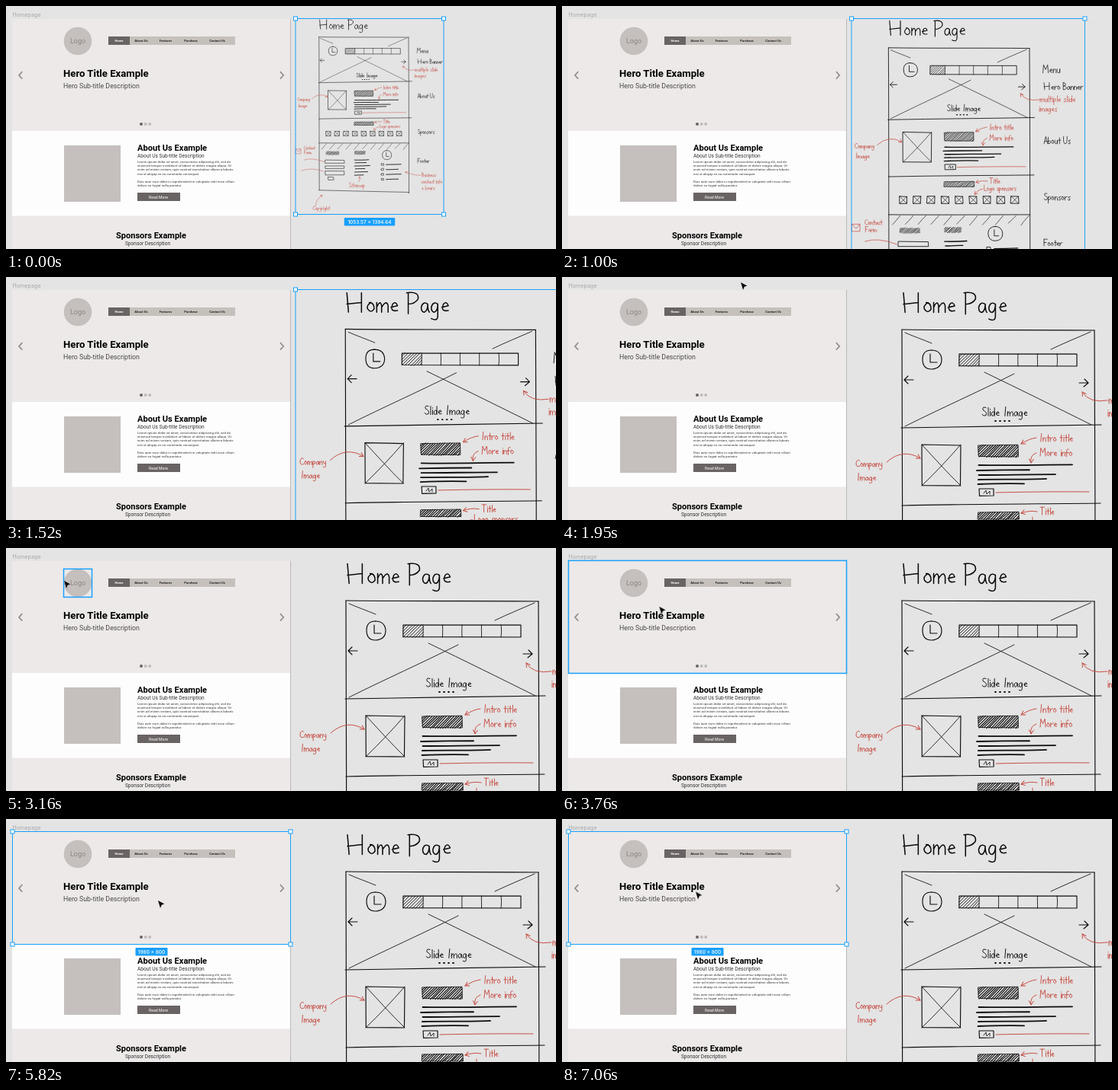
These frames come from a looping animation (720 px wide and 319 px high, 7330 ms). An HTML page:

```html
<!DOCTYPE html>
<html lang="en">
<head>
<meta charset="utf-8">
<title>Wireframe to mockup</title>
<style>
html, body { margin: 0; width: 100%; height: 100%; overflow: hidden; background: #e4e4e4; }
svg { display: block; width: 720px; height: 319px; }
text { font-family: Roboto, "Open Sans", sans-serif; fill: #111; }
.b { font-weight: 700; fill: #000; }
.mid { text-anchor: middle; }
.nav text { font-size: 4.2px; font-weight: 700; text-anchor: middle; fill: #222; }
.nav .on, .btn { fill: #fff; }
.body text { font-size: 4.4px; fill: #333; }
.ui, .tag text { font-family: Inter, Roboto, sans-serif; }
.chev { fill: none; stroke: #97918f; stroke-width: 1.8; }
.edge { fill: none; stroke: #18a0fb; }
.grip { fill: #fff; stroke: #18a0fb; }
.tag rect { fill: #18a0fb; }
.tag text { font-size: 6.5px; font-weight: 500; fill: #fff; text-anchor: middle; }
#sketch path { fill: none; stroke: #0c0c0c; stroke-linecap: round; stroke-linejoin: round; stroke-width: 1.15; }
#sketch .thin { stroke-width: .85; }
#sketch .bold { stroke-width: 1.8; }
#sketch .red { stroke: #c5483f; stroke-width: .95; }
.loop { animation: 7330ms infinite; }
#cursor { animation-name: roam; animation-timing-function: ease-in-out; }
#logoHover { animation-name: logoHover; animation-timing-function: step-end; }
#heroHover { animation-name: heroHover; animation-timing-function: step-end; }
#heroPick { animation-name: heroPick; animation-timing-function: step-end; }
@keyframes roam {
  0%, 24.96% { opacity: 0; transform: translate(239px, 9px); }
  24.97% { opacity: 1; transform: translate(239px, 9px); }
  26.55%, 37.24% { transform: translate(234px, 7px); }
  43.05%, 43.9% { transform: translate(76px, 43px); }
  46.66%, 47.34% { transform: translate(92px, 60px); }
  56.75%, 57.84% { transform: translate(188px, 106px); }
  64.2%, 64.7% { transform: translate(213px, 114px); }
  66.58%, 69.58% { transform: translate(214px, 115px); }
  71.9%, 75.03% { transform: translate(210px, 112px); }
  79.4%, 88.68% { transform: translate(199px, 107px); }
  89.9%, 92.5% { transform: translate(195px, 105px); }
  96.3%, 100% { opacity: 1; transform: translate(175px, 95.5px); }
}
@keyframes logoHover { 0% { opacity: 0; } 42.4% { opacity: 1; } 47.34% { opacity: 0; } }
@keyframes heroHover { 0% { opacity: 0; } 39.6% { opacity: 1; } 42.4% { opacity: 0; } 47.34% { opacity: 1; } 58.5% { opacity: 0; } }
@keyframes heroPick { 0% { opacity: 0; } 58.5%, 100% { opacity: 1; } }
</style>
</head>
<body>
<svg viewBox="0 0 720 319">
  <rect width="720" height="319" fill="#e4e4e4"/>
  <text class="ui" x="8.5" y="14.3" font-size="7" letter-spacing=".1" style="fill:#a6a6a6">Homepage</text>

  <rect x="8" y="17" width="364" height="302" fill="#ece9e8"/>
  <rect x="8" y="164" width="364" height="111.5" fill="#fefdfd"/>
  <path d="M372.5 17V319" stroke="#b9b9b9"/>

  <circle cx="94" cy="46" r="18.3" fill="#c5bfbd"/>
  <text class="mid" x="94" y="49" font-size="9" style="fill:#8c8582">Logo</text>
  <g class="nav">
    <rect x="134" y="40" width="166" height="11" fill="#c6c0bd"/>
    <rect x="134" y="40" width="28" height="11" fill="#6a6363"/>
    <text class="on" x="148" y="47">Home</text>
    <text x="177" y="47">About Us</text>
    <text x="209" y="47">Features</text>
    <text x="242" y="47">Purchase</text>
    <text x="276.5" y="47">Contact Us</text>
  </g>
  <path class="chev" d="M21.3 86.2L17 91L21.3 95.6M358.9 86.2L363.2 91L358.9 95.6"/>
  <text class="b" x="75" y="93.3" font-size="13.15">Hero Title Example</text>
  <text x="75" y="107.8" font-size="8.8" style="fill:#4c4a4a">Hero Sub-title Description</text>
  <circle cx="177" cy="155" r="2" fill="#6a6363"/>
  <circle cx="182.7" cy="155" r="2" fill="#c0bab8"/>
  <circle cx="188.2" cy="155" r="2" fill="#c0bab8"/>

  <rect x="76" y="183" width="74" height="74" fill="#c5bfbd"/>
  <text class="b" x="172" y="190.2" font-size="11.1">About Us Example</text>
  <text x="172" y="199.2" font-size="6.6" style="fill:#333">About Us Sub-title Description</text>
  <g class="body">
    <text x="172" y="206.2">Lorem ipsum dolor sit amet, consectetur adipiscing elit, sed do</text>
    <text x="172" y="211.3">eiusmod tempor incididunt ut labore et dolore magna aliqua. Ut</text>
    <text x="172" y="216.4">enim ad minim veniam, quis nostrud exercitation ullamco laboris</text>
    <text x="172" y="221.5">nisi ut aliquip ex ea commodo consequat.</text>
    <text x="172" y="231.7">Duis aute irure dolor in reprehenderit in voluptate velit esse cillum</text>
    <text x="172" y="236.8">dolore eu fugiat nulla pariatur.</text>
  </g>
  <rect x="172" y="245" width="56" height="11" fill="#6a6363"/>
  <text class="btn mid" x="199.5" y="252.6" font-size="5.2">Read More</text>

  <text class="b mid" x="190" y="304.8" font-size="11">Sponsors Example</text>
  <text class="mid" x="185.5" y="313.6" font-size="6.55" style="fill:#333">Sponsor Description</text>

  <g id="sketch"></g>
  <g id="sketchPick"></g>

  <rect id="heroHover" class="edge loop" x="8.5" y="16.5" width="364" height="148" stroke-width="1.5"/>
  <rect id="logoHover" class="edge loop" x="75.5" y="27.5" width="37" height="37" stroke-width="1.5"/>
  <g id="heroPick" class="loop"></g>
  <path id="cursor" class="loop" d="M0 0L8.3 4.4L4.8 5.8L3 10Z" fill="#0a0a0a" stroke="#eee" stroke-width=".5" paint-order="stroke"/>
</svg>

<script>
const NS = 'http://www.w3.org/2000/svg';
const $ = id => document.getElementById(id);
function el(name, attrs, parent) {
  const node = document.createElementNS(NS, name);
  for (const k in attrs) node.setAttribute(k, attrs[k]);
  return parent.appendChild(node);
}

// Handwriting: single-stroke letters, baseline at 0, capitals 12 high
const bowl = 'M4-5Q1-7 0-3Q0 0 2 0Q4-1 4-5';
const round = {
  a: bowl + 'Q4-1 5 0', d: bowl + 'M4-11V0', g: bowl + 'V2Q4 6 0 4',
  c: 'M4-5Q1-7 0-3Q0 1 4-1', e: 'M0-3L4-4Q3-7 1-5Q-1 0 4-1',
  o: 'M2-6Q-1-4 0-2Q2 1 4-2Q4-6 1-6', s: 'M4-6Q0-6 1-4Q5-2 3 0Q1 1 0-1'
};
const stems = {
  b: 'M0-11V0Q4 0 4-3Q3-7 0-4', f: 'M4-10Q1-12 1-6V1M-1-5H4', h: 'M0-11V0M0-4Q4-8 4 0',
  i: 'M1-6V0M1-9v.5', l: 'M1-11V0', t: 'M2-10V0M0-6H4', '+': 'M2-6V0M0-3H4',
  m: 'M0-6V0M0-3Q2-8 3-4V0M3-3Q6-8 7-4V0', n: 'M0-6V0M0-3Q3-8 4-4V0',
  p: 'M0-6V5M0-4Q3-8 4-4Q4 0 0-1', r: 'M0-6V0M0-3Q1-6 4-6',
  u: 'M0-6Q-1 0 2 0Q4 0 4-6V0', y: 'M0-6Q0-1 4-2M4-6V2Q4 6 0 4'
};
const caps = {
  A: 'M0 0L3-12L6 0M1-4H5', B: 'M0-12V0Q6 0 5-4Q4-7 0-6Q5-7 4-10Q3-12 0-12',
  C: 'M6-10Q2-14 0-6Q0 2 6-1', F: 'M0-12V0M0-12H6M0-6H4', H: 'M0-12L1 0M9-12V0M0-5L9-6',
  I: 'M3-12L2 0', L: 'M0-12V0H5', M: 'M0 0L1-12L4-5L7-12L8 0',
  P: 'M1-12V1M0-12Q8-13 7-8Q5-5 1-5', S: 'M5-11Q0-13 1-8Q7-5 5-1Q2 1 0-2',
  T: 'M0-12H7M3-12V0', U: 'M0-12Q-1 0 3 0Q6 0 6-12'
};
const glyphs = { ...round, ...stems, ...caps };
const advance = {
  ' ': 4, a: 6.2, d: 6, g: 6.5, c: 5, s: 5.3, f: 5, i: 2.6, l: 2.6, t: 4.8, m: 8.8, r: 5,
  A: 7, B: 7, C: 7.5, F: 7, H: 12.8, I: 5.5, L: 6, M: 10, P: 9, S: 7, T: 8, U: 7.5
};

const sketch = $('sketch');
const pen = (d, cls = '') => el('path', { d, class: cls }, sketch);

let seed = 7;
const rand = () => (seed = seed * 16807 % 2147483647) / 2147483647;
const wob = n => (rand() - .5) * n;

function write(str, x, y, size, cls = '', weight = .95) {
  const g = el('g', { transform: `translate(${x} ${y}) scale(${size})` }, sketch);
  let at = 0;
  for (const ch of str) {
    if (glyphs[ch]) el('path', {
      d: glyphs[ch], class: cls, transform: `translate(${at} 0)`, style: `stroke-width:${weight / size}`
    }, g);
    at += advance[ch] || 5.6;
  }
}
// Slightly wavy pen stroke
function line(x1, y1, x2, y2, cls) {
  const bend = u => `${x1 + (x2 - x1) * u + wob(2)} ${y1 + (y2 - y1) * u + wob(2)}`;
  pen(`M${x1} ${y1}C${bend(.35)} ${bend(.65)} ${x2} ${y2}`, cls);
}
function box(x, y, w, h, cls) {
  pen(`M${x} ${y}L${x + w} ${y + wob(2)}L${x + w + wob(2)} ${y + h}L${x + wob(2)} ${y + h + wob(1)}Z`, cls);
}
function crossed(x, y, w, h, cls) {
  box(x, y, w, h, cls);
  line(x, y, x + w, y + h, 'thin');
  line(x + w, y, x, y + h, 'thin');
}
function hatch(x, y, w, h, step, cls) {
  let d = '';
  for (let i = step; i < w + h; i += step) {
    const a = Math.min(i, w), b = Math.max(0, i - h);
    d += `M${x + a} ${y + i - a + wob(1.4)}L${x + b} ${y + i - b + wob(1.4)}`;
  }
  pen(d, cls);
}
function scribble(x, y, w, h) {
  hatch(x, y, w, h, 3.2);
  box(x, y, w, h, 'thin');
}
function rows(x, ys, ends) {
  ys.forEach((y, i) => line(x + wob(4), y, ends[i], y - 1 + wob(1), 'bold'));
}
function arrow(d, x, y, turn) {
  pen(d, 'red');
  el('path', { d: 'M5-3L0 0L5 3', class: 'red', transform: `translate(${x} ${y}) rotate(${turn})` }, sketch);
}

write('Home Page', 447, 46.5, 2.15, '', 1.55);

// Outer frame and dividers
line(445, 69, 697, 70);
line(445, 69, 446, 500);
line(697, 70, 698, 510);
line(444, 198, 706, 194);
line(445, 300, 705, 297);
line(445, 368, 698, 368);
line(444, 501, 698, 507);

// Hero
line(449, 73, 484, 87, 'thin');
line(692, 72, 640, 95, 'thin');
line(553, 125, 693, 194, 'thin');
line(592, 127, 449, 196, 'thin');
pen('M484 96Q472 96 472 108Q472 121 484 121Q497 120 497 108Q496 96 483 96');
pen('M482 101V112H491');
box(520, 101, 154, 16);
for (let i = 0; i < 5; i++) line(546 + i * 25.5, 101, 546 + i * 25.5, 117, 'thin');
hatch(520, 101, 26, 16, 4, 'thin');
pen('M460 135H448M453 130L448 135L453 140M677 139H689M684 134L689 139L683 144');
write('Slide Image', 550, 182.5, 1);
pen('M567 189h1M573 189h1M579 189h1M585 189h1', 'bold');

// About
crossed(471, 220, 51, 54);
scribble(545, 221, 52, 15);
rows(544, [247, 254, 260, 266, 272], [668, 612, 646, 634, 605]);
box(546, 278, 19, 9);
pen('M552 284L555 280L556 285L560 281V285', 'thin');
line(568, 283, 690, 282, 'red');

// Sponsors
scribble(545, 309, 53, 9);
for (let i = 0; i < 9; i++) crossed(465 + i * 24.9, 335, 13, 13);

// Footer
for (let x = 452; x < 690; x += 23) line(x + 14, 370, x, 385 + wob(4), 'thin');
hatch(465, 392, 36, 9, 2.8);
hatch(545, 391, 30, 9, 2.8);
box(463, 416, 53, 9);
box(463, 433, 53, 7);
box(463, 447, 53, 11);
box(471, 464, 15, 8);
rows(546, [416, 424, 433, 441, 450, 459], [585, 578, 588, 574, 582, 570]);
pen('M636 389Q623 390 623 402Q624 415 636 415Q649 414 649 402Q648 389 635 389');
pen('M634 395V406H642');
for (let i = 0; i < 4; i++) {
  box(621, 426 + i * 14, 6, 5);
  line(634, 429 + i * 14, 676 - i % 2 * 8, 428 + i * 14, 'bold');
}

// Side labels
write('Menu', 721, 114, 1.2);
write('Hero Banner', 723, 144, 1.04);
write('About Us', 723, 241, 1.07);
write('Sponsors', 723, 342, 1.07);
write('Footer', 723, 424, 1);

// Red notes
const note = (s, x, y, size) => write(s, x, y, size, 'red', .9);
note('multiple slide', 716, 166, 1);
note('images', 714, 183, .95);
arrow('M714 162Q690 166 681 151', 681, 151, 55);
note('Company', 385, 249, .78);
note('Image', 386, 267, .8);
arrow('M425 243Q446 224 469 238', 469, 238, 210);
note('Intro title', 625, 216, .88);
arrow('M621 211Q612 212 601 219', 601, 219, -30);
note('More info', 626, 235, .88);
arrow('M621 231Q612 234 614 244', 614, 244, -85);
note('Title', 626, 312, .82);
arrow('M622 308Q612 306 601 310', 601, 310, -15);
note('Logo sponsors', 616, 325, .82);
arrow('M613 322Q605 323 599 332', 599, 332, -50);
note('Contact', 403, 386, .8);
note('Form', 404, 399, .8);
pen('M380 385H394V398H380ZM380 385L387 393L394 385', 'red');
pen('M403 416Q425 408 460 421M396 446Q425 436 458 448', 'red');
note('Copyright', 428, 557, 1);
arrow('M435 546Q436 528 454 515', 454, 515, 140);
note('Sitemap', 529, 493, 1.15);
arrow('M556 478Q562 474 559 463', 559, 463, 80);
note('Business', 735, 463, .95);
note('contact info', 733, 482, 1);
note('+ hours', 735, 500, 1);
arrow('M731 459Q712 460 688 450', 688, 450, 20);

// Selection frame with four grips and a size tag
function makePick(g) {
  const edge = el('path', { class: 'edge' }, g);
  const grips = [0, 1, 2, 3].map(() => el('rect', { class: 'grip', width: 5, height: 5 }, g));
  const tag = el('g', { class: 'tag' }, g);
  const plate = el('rect', { height: 10.5, rx: 1 }, tag);
  const label = el('text', {}, tag);
  const set = (node, attrs) => { for (const k in attrs) node.setAttribute(k, attrs[k]); };
  return (x, y, width, height, str, tagWidth) => {
    const cx = x + width / 2, ty = y + height + 4.5;
    set(edge, { d: `M${x} ${y}h${width}M${x} ${y}v${height}M${x + width} ${y}v${height}M${x} ${y + height}h${width}` });
    grips.forEach((n, i) => set(n, { x: x + (i % 2) * width - 2.5, y: y + (i >> 1) * height - 2.5 }));
    set(plate, { x: cx - tagWidth / 2, y: ty, width: tagWidth });
    set(label, { x: cx, y: ty + 7.7 });
    label.textContent = str;
  };
}
makePick($('heroPick'))(8.5, 16.5, 364, 148, '1980 × 800', 42);
const placePick = makePick($('sketchPick'));

const LOOP = 7330, START = .4654;
const smooth = u => u * u * (3 - 2 * u);
const easeOut = u => 1 - (1 - u) ** 2;
const zoomKeys = [
  [290, START], [1000, .7327, smooth], [1080, .7327, smooth], [1280, .956, smooth], [1770, 1, easeOut]
];
function zoomAt(t) {
  if (t <= zoomKeys[0][0]) return START;
  for (let i = 1; i < zoomKeys.length; i++) {
    const [t0, a] = zoomKeys[i - 1], [t1, b, ease] = zoomKeys[i];
    if (t < t1) return a + (b - a) * ease((t - t0) / (t1 - t0));
  }
  return 1;
}

function draw(t) {
  const s = zoomAt(t), k = s / START;
  sketch.setAttribute('transform', `translate(379 16) scale(${s}) translate(-379 -16)`);
  $('sketchPick').style.display = t < 1830 ? '' : 'none';
  const size = `${(1053.57 * k).toFixed(2)} × ${(1394.64 * k).toFixed(2)}`;
  placePick(379, 16.5, 194 * k, 257 * k, size, 66.5);
}
draw(0);

let start;
requestAnimationFrame(function tick(now) {
  start ??= now;
  draw((now - start) % LOOP);
  requestAnimationFrame(tick);
});
</script>
</body>
</html>
```
